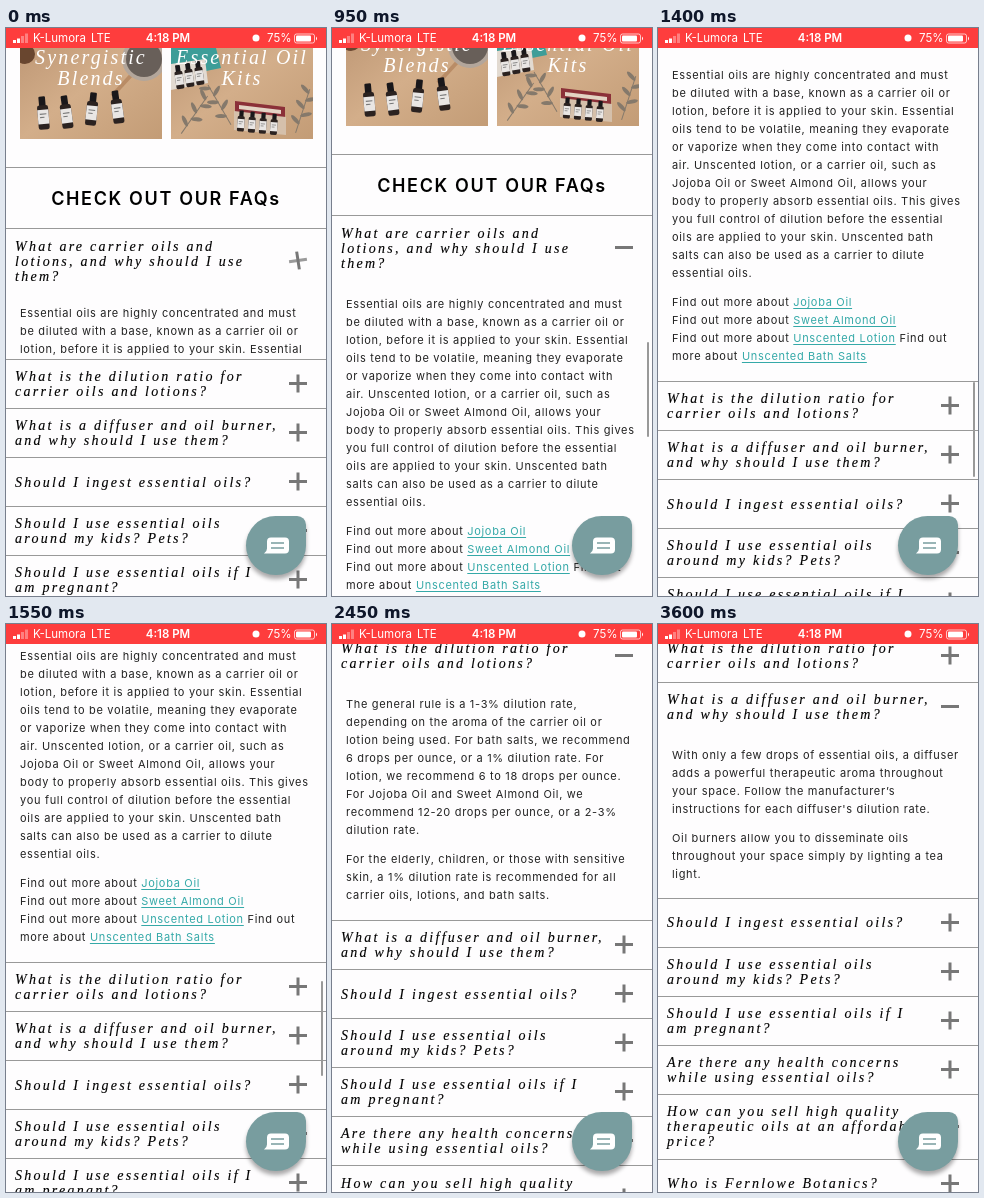
These frames come from a looping animation (320 px wide and 568 px high, 3650 ms). An HTML page:

```html
<!DOCTYPE html>
<html lang="en">
<head>
<meta charset="utf-8">
<title>FAQ accordion</title>
<style>
  * { box-sizing: border-box; }
  html, body { margin: 0; height: 100%; overflow: hidden; }
  body { position: relative; background: #fefdfe; font: 11px/18px Inter, sans-serif; color: #222; }
  #stage { position: absolute; width: 320px; height: 568px; overflow: hidden; white-space: pre; }
  #page, #photos { position: absolute; top: 0; left: 0; width: 320px; }
  #photos text { font: italic 20px "Liberation Serif", serif; letter-spacing: 2.15px; fill: #fff; text-anchor: middle; }
  h1 { position: absolute; top: 139px; width: 320px; height: 61px; margin: 0; border-top: 1px solid #999;
       font: 600 18px/61px Inter, sans-serif; letter-spacing: 1.65px; text-align: center; color: #000; }
  #faq { position: absolute; top: 200px; width: 320px; }
  .question { position: relative; display: flex; align-items: center; height: 49px; padding-left: 9px;
              border-top: 1px solid #999; color: #000;
              font: italic 14px/15px "Liberation Serif", serif; letter-spacing: 2.27px; -webkit-text-stroke: .12px; }
  .question.tall { height: 65px; }
  .question i { position: absolute; left: 283px; top: calc(50% - 2px); width: 18px; height: 3px; background: #777; }
  .answer { overflow: hidden; height: 0; padding-left: 14px; letter-spacing: .68px; }
  .answer p { margin: 10px 0 11px; }
  .answer p + p { margin-top: 0; }
  u { color: #35a9a8; text-underline-offset: 2px; }
  #thumb { position: absolute; left: 314.5px; width: 2.5px; height: 95px; border-radius: 2px; background: #999; }
  #chat { position: absolute; left: 240px; top: 488px; width: 60px; height: 59px; background: #789d9f;
          border-radius: 30px 9px 30px 30px; box-shadow: 0 4px 4px #0005; }
  #status { position: absolute; top: 0; left: 0; width: 320px; height: 20px; background: #fe3d3d; }
  #status text { font: 11.5px Inter, sans-serif; fill: #fff; }
  #status .clock { font-weight: 600; text-anchor: middle; }
</style>
</head>
<body>
<div id="stage">
  <div id="page">
    <svg id="photos" width="320" height="111"></svg>
    <h1>CHECK OUT OUR FAQs</h1>
    <div id="faq"></div>
  </div>
  <div id="thumb"></div>
  <svg id="chat" viewBox="0 0 60 59">
    <path d="M25 21.500h14q4 0 4 4v8q0 4-4 4H18q3-2 3-5v-7q0-4 4-4z" fill="#fff"/>
    <path d="M25 27h13M25 32h13" stroke="#789d9f" stroke-width="1.6"/>
  </svg>
  <svg id="status">
    <g fill="#fff">
      <path d="M7 12h3v3H7zM11 10.500h3V15h-3z"/>
      <path d="M15 8h3v7h-3zM19 5.500h3V15h-3z" opacity=".35"/>
      <circle cx="250" cy="10" r="3.500"/>
      <rect x="290" y="7.500" width="15" height="6" rx="1"/>
      <path d="M310 8.500q2 2 0 4z"/>
    </g>
    <rect x="288.500" y="6" width="20" height="9" rx="2" fill="none" stroke="#fff" opacity=".7"/>
    <text x="27" y="14">K-Lumora</text>
    <text x="85" y="14">LTE</text>
    <text x="162" y="14" class="clock">4:18 PM</text>
    <text x="261" y="14">75%</text>
  </svg>
</div>
<script>
const LOOP = 3650, STEP = 50, SLIDE = 385;
const $ = id => document.getElementById(id);
const clamp = x => Math.min(1, Math.max(0, x));
const swing = p => .5 - Math.cos(Math.PI * clamp(p)) / 2;

// Photo cards
const bottle = (x, y, turn = 0, size = 1) =>
  `<g transform="translate(${x} ${y}) rotate(${turn}) scale(${size})">
    <rect x="-3" y="-15" width="6" height="9" rx="1" fill="#19171a"/>
    <rect x="-5" y="-7" width="10" height="22" rx="2" fill="#2b2220"/>
    <rect x="-5" y="-3" width="10" height="13" fill="#e9e6e4"/>
    <path d="M-3 1h6M-3 4h4" stroke="#777"/></g>`;
const sprig = (x, y, turn) => {
  let leaves = '';
  for (let i = 0; i < 5; i++)
    leaves += `<ellipse cx="${i % 2 ? 5 : -5}" cy="${i * 8 - 18}" rx="6" ry="2" transform="rotate(${i % 2 ? -30 : 30} 0 ${i * 8 - 18})"/>`;
  return `<g transform="translate(${x} ${y}) rotate(${turn})" fill="#85796b"><path d="M0-22V24" stroke="#85796b"/>${leaves}</g>`;
};
const card = (x, shapes, top, bottom) =>
  `<svg x="${x}" width="142" height="111"><rect width="142" height="111" fill="url(#wood)"/>${shapes}
   <text x="71" y="36">${top}</text><text x="71" y="57">${bottom}</text></svg>`;

$('photos').innerHTML =
  `<linearGradient id="wood" x2="1" y2="1"><stop stop-color="#bb9472"/><stop offset=".5" stop-color="#d3ae8a"/><stop offset="1" stop-color="#c39c76"/></linearGradient>` +
  card(14,
    `<path d="M92 68l24-26" stroke="#b98c66" stroke-width="4"/>
     <circle cx="124" cy="31" r="22" fill="#b3a69b"/><circle cx="124" cy="31" r="18" fill="#685f59"/>
     <circle cx="5" cy="26" r="10" fill="#69462f"/>` +
    bottle(23, 85, -5, 1.1) + bottle(46, 84, -8, 1.1) + bottle(72, 81, 6, 1.1) + bottle(97, 79, -8, 1.1),
    'Synergistic', 'Blends') +
  card(165,
    `<path d="M0 20l44-4 6 24-50 10z" fill="#3d9d98"/><path d="M0 36l34-5 3 24-37 7z" fill="#e2dad1"/>` +
    bottle(8, 49, -8, .8) + bottle(18, 47, -8, .8) + bottle(28, 45, -8, .8) +
    sprig(24, 86, 35) + sprig(132, 82, 18) + sprig(48, 76, -30) +
    `<path d="M64 73l50 6v25l-50-5z" fill="#8b3038"/><path d="M68 77l42 5v4l-42-5z" fill="#e3d3c4"/>
     <path d="M63 83l52 6v18l-52-5z" fill="#d5c0ab"/>` +
    [70, 81, 92, 103].map(x => bottle(x, x * .1 + 86, 4, .7)).join(''),
    'Essential Oil', 'Kits');

// Questions, with answers as paragraphs of fixed lines
const faq = [
  ['What are carrier oils and\nlotions, and why should I use\nthem?',
   `Essential oils are highly concentrated and must
be diluted with a base, known as a carrier oil or
lotion, before it is applied to your skin. Essential
oils tend to be volatile, meaning they evaporate
or vaporize when they come into contact with
air. Unscented lotion, or a carrier oil, such as
Jojoba Oil or Sweet Almond Oil, allows your
body to properly absorb essential oils. This gives
you full control of dilution before the essential
oils are applied to your skin. Unscented bath
salts can also be used as a carrier to dilute
essential oils.`,
   `Find out more about <u>Jojoba Oil</u>
Find out more about <u>Sweet Almond Oil</u>
Find out more about <u>Unscented Lotion</u> Find out
more about <u>Unscented Bath Salts</u>`],
  ['What is the dilution ratio for\ncarrier oils and lotions?',
   `The general rule is a 1-3% dilution rate,
depending on the aroma of the carrier oil or
lotion being used. For bath salts, we recommend
6 drops per ounce, or a 1% dilution rate. For
lotion, we recommend 6 to 18 drops per ounce.
For Jojoba Oil and Sweet Almond Oil, we
recommend 12-20 drops per ounce, or a 2-3%
dilution rate.`,
   `For the elderly, children, or those with sensitive
skin, a 1% dilution rate is recommended for all
carrier oils, lotions, and bath salts.`],
  ['What is a diffuser and oil burner,\nand why should I use them?',
   `With only a few drops of essential oils, a diffuser
adds a powerful therapeutic aroma throughout
your space. Follow the manufacturer’s
instructions for each diffuser's dilution rate.`,
   `Oil burners allow you to disseminate oils
throughout your space simply by lighting a tea
light.`],
  ['Should I ingest essential oils?'],
  ['Should I use essential oils\naround my kids? Pets?'],
  ['Should I use essential oils if I\nam pregnant?'],
  ['Are there any health concerns\nwhile using essential oils?'],
  ['How can you sell high quality\ntherapeutic oils at an affordable\nprice?'],
  ['Who is Fernlowe Botanics?'],
];
$('faq').innerHTML = faq.map(([question, ...answer]) =>
  `<div class="question${question.split('\n').length > 2 ? ' tall' : ''}"><span>${question}</span><i></i><i></i></div>` +
  `<div class="answer">${answer.map(p => `<p>${p}</p>`).join('')}</div>`).join('');

const questions = [...document.querySelectorAll('.question')];
const answers = [...document.querySelectorAll('.answer')];
const heights = faq.map(([, ...answer]) => answer.join('\n').split('\n').length * 18 + 42);

// Each tap opens one answer and closes the one before it
const taps = [-114, 2020, 3238];
const openness = (i, t, delay, length) => {
  const part = k => k < taps.length ? swing((t - taps[k] - delay) / length) : 0;
  return part(i) - part(i + 1);
};

const scrollAt = t => t < 1200
  ? Math.max(0, (t - 928) * .596)
  : 258 - 96 * (1 - clamp((t - 1200) / 450)) ** 3;

function draw(t) {
  questions.forEach((question, i) => {
    const open = openness(i, t, 0, SLIDE), turn = openness(i, t, 56, 290);
    answers[i].style.height = heights[i] * open + 'px';
    answers[i].style.paddingTop = 5 * open + 'px';
    const [across, upright] = question.querySelectorAll('i');
    across.style.transform = `rotate(${-90 * turn}deg)`;
    across.style.opacity = (1 - turn) ** 3;
    upright.style.transform = `rotate(${-90 - 90 * turn}deg)`;
  });
  const scroll = scrollAt(t);
  $('page').style.transform = `translateY(${-Math.round(scroll)}px)`;
  $('thumb').style.top = 311.5 + scroll * .1755 + 'px';
  $('thumb').style.opacity = t < 950 ? 0 : clamp((1800 - t) / 150);
}

const start = performance.now();
function tick() {
  const t = (performance.now() - start) % LOOP;
  draw(Math.floor(t / STEP) * STEP);
  requestAnimationFrame(tick);
}
tick();
</script>
</body>
</html>
```
